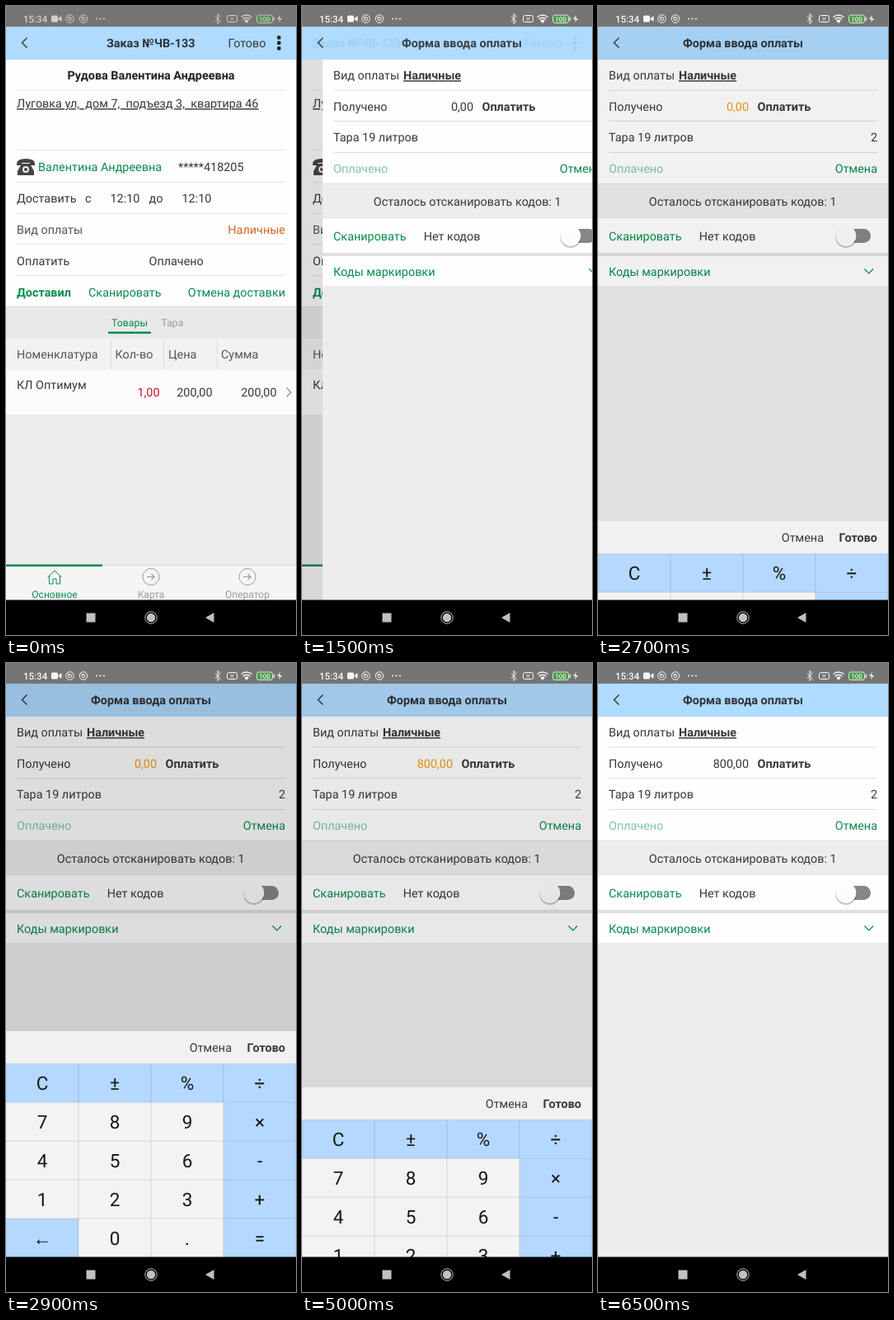
An HTML page that plays this animation: 352 px wide and 762 px high, repeating every 7.2 s.

```html
<!DOCTYPE html>
<html lang="ru">
<head>
<meta charset="utf-8">
<title>Оплата заказа</title>
<style>
html, body { margin: 0; width: 100%; height: 100%; overflow: hidden; background: #000; }
svg { display: block; width: 352px; height: 762px; }
text { font: 14.4px Roboto, "Noto Sans", sans-serif; white-space: pre; text-rendering: geometricPrecision; }
.u { text-decoration: underline; text-decoration-thickness: 1px; text-underline-offset: 2px; }
.thin { text-decoration-color: #9a9a9a; }
</style>
</head>
<body>
<svg id="stage" viewBox="0 0 352 762"></svg>
<script>
const LOOP = 7200, TICK = 100;
const INK = '#383838', GREEN = '#078b4c', GREY = '#9b9b9b', BLUE = '#b4d8ff';
const ANCHOR = { l: 'start', c: 'middle', r: 'end' };

// y is the middle of the capital letters
function text(x, y, str, { at = 'l', fill = INK, size = 14.4, bold = 0, more = '' } = {}) {
  const weight = bold === 1 ? 700 : bold || 400;
  return `<text x="${x}" y="${y + size * 0.355}" text-anchor="${ANCHOR[at]}" fill="${fill}" ` +
    `style="font-size:${size}px;font-weight:${weight}" ${more}>${str}</text>`;
}
const rect = (x, y, w, h, fill, more = '') =>
  `<rect x="${x}" y="${y}" width="${w}" height="${h}" fill="${fill}" ${more}/>`;
const path = (d, stroke, width = 1, fill = 'none') =>
  `<path d="${d}" fill="${fill}" stroke="${stroke}" stroke-width="${width}"/>`;
const circle = (x, y, r, fill, stroke = 'none', width = 1) =>
  `<circle cx="${x}" cy="${y}" r="${r}" fill="${fill}" stroke="${stroke}" stroke-width="${width}"/>`;
const group = (id, body, more = '') => `<g id="${id}" ${more}>${body}</g>`;
const rules = (ys, fill) => ys.map(y => rect(13, y, 326, 1, fill)).join('');

function statusBar() {
  const ring = x => circle(x, 15.5, 4.8, 'none', '#fff') + circle(x, 15.5, 2, 'none', '#fff') +
    path(`M${x - 3} 12.5l3 3`, '#fff');
  return rect(0, 0, 352, 25, '#757575') + group('icons',
    text(21, 15.5, '15:34', { fill: '#fff', size: 11.5, bold: 500 }) +
    rect(55, 11.5, 8, 8, '#fff', 'rx="1.5"') + path('M63 15.5l4.500-3.500v7z', 'none', 0, '#fff') +
    ring(77.5) + ring(94) +
    [110, 114.5, 119].map(x => circle(x, 15.5, 1, '#fff')).join('') +
    path('M254 12.5l6 6-3 3v-12l3 3-6 6', '#fff') +
    rect(268.5, 11.5, 12, 8, 'none', 'rx="2" stroke="#fff"') + path('M272.5 13.5l4 4m0-4l-4 4', '#fff') +
    path('M285.5 13.5q6.500-5 13 0M287.500 16q4.500-3.500 9 0', '#fff', 1.4) +
    path('M289 17.500q3-2 6 0l-3 3.500z', 'none', 0, '#fff') +
    rect(304.5, 11, 19, 9.5, '#4b9a48', 'rx="2.500" stroke="#d9f3d4"') + rect(324.5, 13.5, 1.6, 4.5, '#d9f3d4') +
    text(314, 15.8, '100', { at: 'c', fill: '#fff', size: 8, bold: 500 }) +
    path('M333 11l-4 5h3l-1 4 4-5h-3z', 'none', 0, '#fff'));
}

function header() {
  const bold = { at: 'c', bold: 1, fill: '#2e3338' };
  return rect(0, 25, 352, 40, '#aedbff') + path('M25.500 38.500l-6 6 6 6', '#2e3338', 1.4) +
    group('oldHead', text(269.5, 45, 'Готово') +
      [38, 44.5, 51].map(y => rect(329, y - 2, 4.5, 4.5, '#222', 'rx="1.500"')).join('')) +
    group('oldTitle', text(175.7, 45, 'Заказ №ЧВ-133', bold)) +
    group('newTitle', text(176, 45, 'Форма ввода оплаты', bold));
}

function orderPage() {
  const green = { fill: GREEN }, r = { at: 'r' };
  const tab = (x, label, fill, icon) => icon + text(x, 712.5, label, { at: 'c', size: 12, fill });
  const arrow = x => circle(x, 691.5, 10, 'none', GREY) +
    path(`M${x - 5} 691.500h9m-3.500-3.500l3.500 3.500-3.500 3.500`, GREY, 1.1);
  return rect(0, 65, 352, 655, '#ececec') + rect(0, 65, 352, 299, '#fdfdfd') +
    rules([101.5, 174, 213, 251, 288, 326], '#e4e4e4') +
    text(176, 84, 'Рудова Валентина Андреевна', { at: 'c', bold: 1, fill: '#222' }) +
    text(13, 118, 'Луговка ул,  дом 7,  подъезд 3,  квартира 46', { more: 'class="u thin"' }) +
    path('M13 191q0-6 11-6t11 6v2h-6v-3h-10v3h-6z', 'none', 0, '#444') +
    path('M19 191h10l5 9v5h-20v-5z', 'none', 0, '#444') + circle(24, 198, 4, '#eee') + circle(24, 198, 2, '#444') +
    text(39, 195, 'Валентина Андреевна', green) + text(209, 195, '*****418205') +
    text(13, 233, 'Доставить') + text(96, 233, 'с') + text(126.5, 233, '12:10') +
    text(173.5, 233, 'до') + text(213.5, 233, '12:10') +
    text(13, 271, 'Вид оплаты', { fill: '#555' }) + text(339, 271, 'Наличные', { at: 'r', fill: '#d0691f' }) +
    text(13, 308.7, 'Оплатить') + text(173.5, 308.7, 'Оплачено') +
    text(13, 346.5, 'Доставил', { fill: GREEN, bold: 1 }) + text(100, 346.5, 'Сканировать', green) +
    text(339, 346.5, 'Отмена доставки', { at: 'r', fill: GREEN }) +
    rect(0, 364, 352, 39, '#e9e9e9') + rect(0, 364, 352, 1, '#dcdcdc') +
    text(150, 384, 'Товары', { at: 'c', fill: GREEN, size: 12.3 }) + rect(124, 394.5, 52, 2.5, GREEN) +
    text(202, 384, 'Тара', { at: 'c', fill: GREY, size: 12.3 }) +
    rect(0, 403, 352, 38, '#f2f2f2') + rect(0, 441, 352, 54, '#fcfcfc') +
    [127, 191, 256].map(x => rect(x, 404, 1, 36, '#dedede')).join('') +
    ['Номенклатура', 'Кол-во', 'Цена', 'Сумма']
      .map((s, i) => text([13, 132.5, 197, 261][i], 422.3, s, { fill: '#555' })).join('') +
    text(13, 459, 'КЛ Оптимум') + text(186.5, 468, '1,00', { at: 'r', fill: '#cf1020' }) +
    text(250.5, 468, '200,00', r) + text(328.5, 468, '200,00', r) +
    path('M340.500 462.500l5.500 5.500-5.500 5.500', '#888', 1.1) +
    rect(0, 677, 352, 43, '#f5f5f5') + rect(0, 677, 352, 1, '#dcdcdc') + rect(0, 676.5, 117, 2.5, GREEN) +
    tab(59, 'Основное', GREEN, path('M50.500 692l8.500-8 8.500 8M52.500 690.500v9.500h4.500v-6h4v6h4.500v-9.500', GREEN)) +
    tab(176, 'Карта', GREY, arrow(176)) + tab(293, 'Оператор', GREY, arrow(293));
}

function payPage() {
  const green = { fill: GREEN }, card = (y, h) => rect(0, y, 352, h, '#fefefe');
  return rect(0, 65, 352, 655, '#ededed') + card(65, 150) + card(256, 43) + card(303, 36) +
    rules([101.5, 139, 177], '#dedede') + rect(0, 215, 352, 1, '#dedede') + rect(0, 256, 352, 1, '#e2e2e2') +
    rect(0, 299, 352, 4, '#e0e0e0') +
    text(13, 84, 'Вид оплаты') + text(98, 84, 'Наличные', { bold: 1, more: 'class="u"' }) +
    text(13, 121.7, 'Получено') + text(183, 121.7, '0,00', { at: 'r', more: 'id="sum"' }) +
    text(193.5, 121.7, 'Оплатить', { bold: 1 }) +
    text(13, 159, 'Тара 19 литров') + text(339, 159, '2', { at: 'r' }) +
    text(13, 197, 'Оплачено', { fill: '#81c5a4' }) + text(339, 197, 'Отмена', { at: 'r', fill: GREEN }) +
    text(175.7, 236.6, 'Осталось отсканировать кодов: 1', { at: 'c' }) +
    text(13, 279, 'Сканировать', green) + text(122.7, 279, 'Нет кодов') +
    rect(293, 270, 38, 17, '#868686', 'rx="8.500"') +
    circle(301, 280.5, 12.8, '#00000022') + circle(301, 279.8, 12.8, '#00000022') + circle(301, 278.5, 12.4, '#fcfcfc') +
    text(13, 321.6, 'Коды маркировки', green) + path('M323.500 318.500l5.300 5.300 5.300-5.300', GREEN, 1.2);
}

const KEYS = ['C±%÷', '789×', '456-', '123+', '←0.='];
const TOP = 485.5, ROW = 46.9;
function keypad() {
  let s = rect(0, 446, 352, 274, '#f1f1f1') +
    text(274, 466.2, 'Отмена', { at: 'r' }) + text(339, 466.2, 'Готово', { at: 'r', bold: 1 });
  KEYS.forEach((line, row) => [...line].forEach((key, col) => {
    const x = col * 88, y = TOP + row * ROW;
    const tinted = row === 0 || col === 3 || key === '←';
    s += rect(x, y, 88, ROW, tinted ? BLUE : '#f3f3f3', `id="key${key}" stroke="#00000014" stroke-width="1"`) +
      text(x + 44, y + ROW / 2 + 0.5, key, { at: 'c', size: 22.5, fill: '#151515' });
  }));
  return s;
}

const navBar = () => rect(0, 719.5, 352, 42.5, '#000') + rect(97.5, 735.5, 11, 11, '#c0c0c0') +
  circle(176, 741, 7.2, 'none', '#c0c0c0') + circle(176, 741, 5.2, '#c0c0c0') +
  path('M252.500 735v12l-10.500-6z', 'none', 0, '#c0c0c0');

document.getElementById('stage').innerHTML =
  group('order', orderPage()) + rect(0, 65, 352, 655, '#000', 'id="shade"') +
  group('pay', payPage()) + header() + rect(0, 25, 352, 695, '#000', 'id="dim"') +
  group('pad', keypad()) + statusBar() + navBar() +
  group('touch', circle(0, 0, 10, '#fffffff0', '#c9cce6', 1.2));

// [time, value] stops, linear in between
const PUSH = [[1100, 0], [1200, 0.04], [1300, 0.222], [1400, 0.66], [1500, 0.93], [1600, 1]];
const PAD = [[2600, 0], [2700, 0.35], [2800, 0.88], [2900, 1], [4900, 1], [5000, 0.752], [5100, 0.25], [5200, 0]];
const DIM = [[2600, 0], [2700, 0.05], [2900, 0.13], [4900, 0.13], [5000, 0.085], [5100, 0.03], [5200, 0]];
const ICONS = [[200, 0.65], [600, 0.95]];
// [from, to, x, y, key]
const TAPS = [
  [900, 1100, 44, 309], [2400, 2700, 147, 121], [3500, 3700, 147, 556, '8'],
  [3900, 4000, 147, 697, '0'], [4100, 4300, 147, 697, '0'], [4800, 5000, 316, 466]
];
const SUMS = [[0, '0,00'], [3600, '8,00'], [4000, '80,00'], [4300, '800,00']];

function track(stops, t) {
  const i = stops.findIndex(s => s[0] > t);
  if (i < 0) return stops[stops.length - 1][1];
  if (i === 0) return stops[0][1];
  const [t0, a] = stops[i - 1], [t1, b] = stops[i];
  return a + (b - a) * (t - t0) / (t1 - t0);
}
const el = id => document.getElementById(id);
const set = (id, name, value) => el(id).setAttribute(name, value);
const move = (id, x, y = 0) => set(id, 'transform', `translate(${x} ${y})`);

function draw(t) {
  const p = track(PUSH, t);
  move('pay', Math.round(352 * (1 - p)));
  set('shade', 'opacity', 0.13 * p);
  move('oldTitle', -118 * p);
  move('newTitle', 256 * (1 - p));
  set('oldTitle', 'opacity', 1 - p);
  set('oldHead', 'opacity', 1 - p);
  set('newTitle', 'opacity', p);
  move('pad', 0, Math.round(274 * (1 - track(PAD, t))));
  set('dim', 'opacity', track(DIM, t));
  set('icons', 'opacity', track(ICONS, t));

  const tap = TAPS.find(s => t >= s[0] && t < s[1]);
  set('touch', 'opacity', tap ? 0.92 : 0);
  if (tap) move('touch', tap[2], tap[3]);
  for (const k of '80') set('key' + k, 'fill', tap && tap[4] === k ? '#cbcbcb' : '#f3f3f3');

  el('sum').textContent = SUMS.filter(s => s[0] <= t).pop()[1];
  set('sum', 'fill', t >= 2500 && t < 5300 ? '#f09c12' : INK);
}

const start = performance.now();
function frame() {
  const t = (performance.now() - start) % LOOP;
  draw(Math.floor(t / TICK) * TICK);
  requestAnimationFrame(frame);
}
frame();
</script>
</body>
</html>
```
